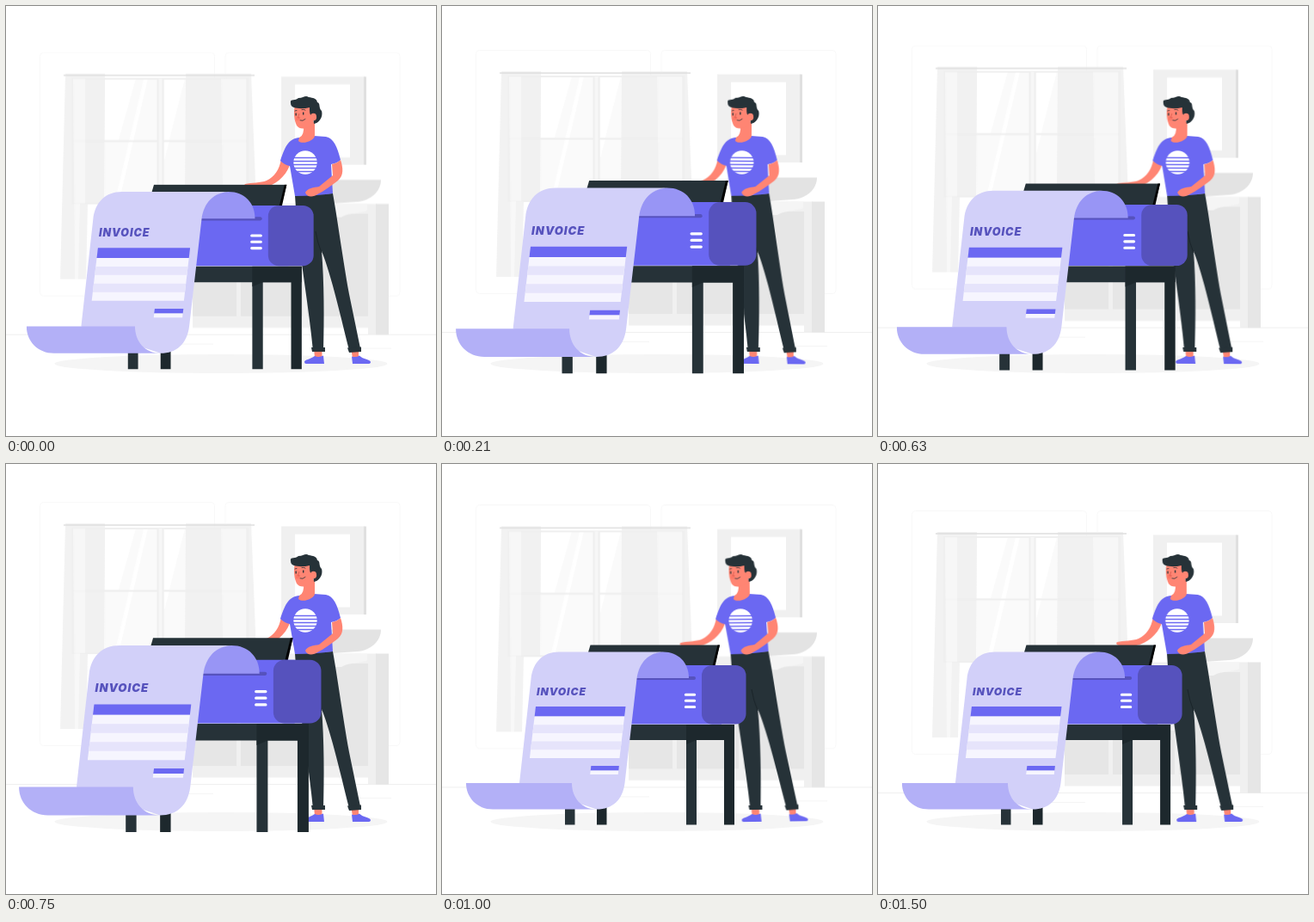
These frames come from a looping animation (500x500 px, 1.54 s). An HTML page without scripts:

```html
<!DOCTYPE html>
<html lang="en">
<head>
<meta charset="utf-8">
<title>Printing an invoice</title>
<style>
  html, body { margin: 0; width: 100%; height: 100%; overflow: hidden; background: #fff; }
  svg { display: block; width: 100vw; height: 100vh; }
  .room, .man, .printer { animation: 1540ms linear infinite; }
  .room { animation-name: float; }
  .man { animation-name: sway; transform-origin: 362px 261px; }
  .printer { animation-name: beat; transform-origin: 190.5px 314px; }
  .violet { fill: #6b68f2; }
  .deep { fill: #5652bd; }
  .dark { fill: #263238; }
  .darker { fill: #1d282d; }
  .skin { fill: #ff8573; }
  .title { font: italic 900 12.2px Inter, Roboto, sans-serif; letter-spacing: .9px; }

  @keyframes float {
    0% { transform: translateY(-.4px); }
    48.7% { transform: translateY(-10px); }
    97.4%, 99% { transform: none; }
    100% { transform: translateY(-.4px); }
  }
  @keyframes sway {
    25% { transform: rotate(.9deg); }
    73% { transform: rotate(-.9deg); }
  }
  /* two pulses, then a rest */
  @keyframes beat {
    0%, 100% { transform: scale(1.025); }
    8.1% { transform: scale(1.103); }
    13.6% { transform: scale(1.074); }
    24.7% { transform: scale(1.018); }
    28.6%, 34.5% { transform: none; }
    40.9% { transform: scale(1.037); }
    45.2% { transform: scale(1.097); }
    48.7% { transform: scale(1.08); }
    64%, 97.4% { transform: none; }
  }
</style>
</head>
<body>
<svg viewBox="0 0 500 500">
  <g class="room">
    <g fill="none" stroke="#f8f8f8">
      <rect x="39.5" y="54.5" width="203" height="283" rx="4"/>
      <rect x="255" y="54.5" width="203" height="283" rx="4"/>
      <path stroke="#efefef" d="M0 382.5H500"/>
      <path stroke="#f5f5f5" d="M52 388.5H92M196 393.5H241M408 398.5H448"/>
    </g>

    <!-- window -->
    <path fill="#fafafa" d="M77 85H281V230H77Z"/>
    <path fill="#fff" d="M115 85H151L131 156H115ZM160 85H165L131 230H126ZM184 85H208L190 156H184ZM184 158H190L184 180Z"/>
    <g fill="none" stroke="#efefef" stroke-width="2">
      <path d="M77 85H281V230H77ZM77 157.5H281"/>
      <path stroke-width="8" d="M179.5 85V230"/>
      <path stroke="#f7f7f7" stroke-width="4" d="M179.5 85V230"/>
    </g>
    <g fill="#efefef" opacity=".8">
      <path d="M69 79H115L114 230H95L93 318H63Z"/>
      <path d="M209 79H285L291 230L292 318H262L258 230H208Z"/>
      <path fill="#f7f7f7" d="M78 85H92V230H86L84 318H80ZM250 85H279V230H252Z"/>
    </g>
    <path stroke="#dedede" stroke-width="1.7" d="M67 81H289"/>

    <!-- picture -->
    <path fill="#f0f0f0" d="M320 82.5H417V185H320Z"/>
    <path fill="#e0e0e0" d="M416 82.5H419V185H416Z"/>
    <path fill="#fff" d="M336 91.5H400V176.5H336Z"/>

    <!-- washstand -->
    <path fill="#f0f0f0" d="M217 230.5H431V382.5H421V374.5H217Z"/>
    <path fill="#e6e6e6" d="M430 230.5H445V382.5H430ZM217 310H268V361H217ZM273 310H345V361H273ZM350 242H421V361H350Z"/>
    <path fill="#f5f5f5" d="M380 230.5H420V238C414 242 400 240 390 246H380Z"/>
    <path fill="#e3e3e3" d="M370 202.5H436C436 216 424 227 408 228L380 230Z"/>
  </g>

  <ellipse cx="250" cy="416" rx="193.5" ry="11" fill="#f5f5f5"/>

  <g class="man">
    <path class="skin" d="M358 398H367.500V409H359ZM401 398H410V409H403Z"/>
    <path class="violet" d="M347 414C347 411 354 411 359 407Q364 409 369 406.500L370 416H349Q347 416 347 414ZM402 407.500Q407 409 411 406.500C415 411 424 411 424 414Q424 416 421 416H403Z"/>
    <path class="dark" d="M336 220L380 218C385 245 391 290 399 335L412 398L399 400C390 365 379 315 367 285C370 320 370 365 369 401L357 401C352 350 343 300 338 250Z"/>
    <path class="dark" d="M355 397H371V402H356ZM397 397.500L413 396.500V402L399 403Z"/>
    <path fill="none" stroke="#1a2429" d="M360 262Q362 275 367 287"/>

    <path class="skin" d="M320 178C318 190 312 199 303 203C296 206 285 205 278 207C276 209 278 211 282 211H300C312 209 325 199 330 185Z"/>
    <path class="violet" d="M341 153C330 154 325 161 319 180Q324 185 330 186L336 221Q360 221 380 218L378 184Q385 183 389 179C385 163 381 154 372 152L358 151Z"/>
    <path class="skin" d="M346 138L359 134V150C360 156 345 162 340 157L341 153Q347 151 346 138Z"/>
    <path class="skin" d="M379 184Q385 183 389 179C392 188 393 197 386 203C378 209 370 215 362 219C358 222 350 223 348 217C350 212 358 211 364 210L380 197Z"/>

    <circle cx="348" cy="182" r="13.700" fill="#fff"/>
    <path stroke="#6b68f2" stroke-width="1.400" d="M334 176.500H362M334 180.500H362M334 184.500H362M334 188.500H362M334 192.500H362"/>

    <path class="skin" d="M336 115C334 124 335 133 338 139C342 145 352 143 357 136L360 116Z"/>
    <path class="dark" d="M331 113C330 107 336 111 340 107C346 107 348 103 352 106C357 107 361 107 362 112C366 113 363 118 367 122C369 129 364 136 358 137L357 127C353 128 353 124 353 118C345 120 338 119 335 118Q331 117 331 113Z"/>
    <ellipse class="skin" cx="357.500" cy="129" rx="3.600" ry="4.300"/>
    <circle cx="339" cy="131" r="2.400" fill="#fa6b5c" opacity=".5"/>
    <path class="dark" d="M336.500 124.500h1.300v3h-1.300ZM345 123.500h1.400v3H345Z"/>
    <path fill="none" stroke="#263238" stroke-width=".8" stroke-linecap="round" d="M336 122L338 121.500M344 120.500Q346 119.500 348 121M342 133Q345 134.500 348 131.500"/>
    <path fill="none" stroke="#d9584c" stroke-width=".8" d="M341 125L339.500 130H342"/>
  </g>

  <g class="printer">
    <path class="dark" d="M143 390H154.500V419.500H143ZM284 303H296V419.500H284ZM210 303H340V321H210Z"/>
    <path class="darker" d="M180 390H191.500V419.500H180ZM328 303H340V419.500H328ZM284 303H340V321H296L284 326Z"/>
    <path class="dark" d="M172.500 210.500H323L316.500 236H165Z"/>
    <path d="M320.500 210.500H323L317.500 235H314.500Z"/>
    <path class="violet" d="M214 234H325V302.500H210Z"/>
    <rect class="deep" x="302" y="234" width="51.500" height="68.500" rx="12"/>
    <rect class="deep" x="220" y="247" width="75" height="4" rx="2"/>
    <path stroke="#fff" stroke-width="3" stroke-linecap="round" d="M283.300 268.200H293.700M283.300 275.300H293.700M283.300 282.400H293.700"/>

    <path fill="#9895f5" d="M226 249C226 231 240 218.500 257 218.500C275 218.500 287 231 287 249Z"/>
    <path fill="#d2d0f9" d="M90 371L103.500 250C105.500 230 118 218.500 136 218.500H258C241 219 229 230 226.500 250L212.500 371C210 391 198 401.500 180 401.500L145 390Z"/>
    <path fill="#b3b0f7" d="M28 371H151C151 388 162 401.500 180 401.500H59C41 401.500 28 388 28 371Z"/>

    <text class="title deep" x="110" y="269">INVOICE</text>
    <g transform="translate(109 282) skewX(-6.700)">
      <path class="violet" d="M0 0H104.500V11.500H0Z"/>
      <path fill="#f6f5fe" d="M0 11.500H104.500V60H0Z"/>
      <path fill="#e6e4fb" d="M0 21.200H104.500V30.900H0ZM0 40.600H104.500V50.300H0Z"/>
      <path class="violet" d="M72.500 69H105V74.500H72.500Z"/>
      <path fill="#f6f5fe" d="M72.500 74.500H105V79H72.500Z"/>
    </g>
  </g>
</svg>
</body>
</html>
```
